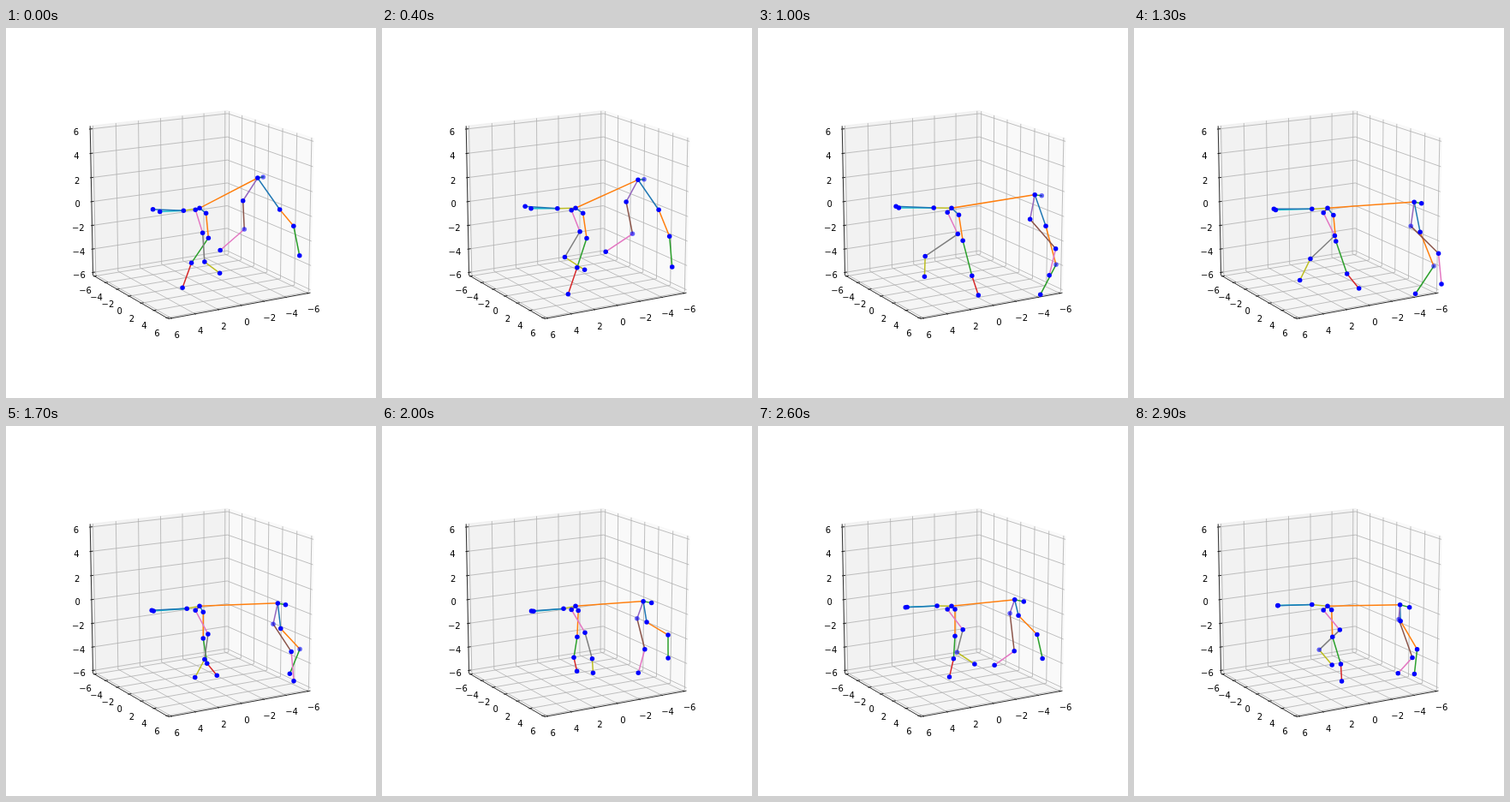
Recreate the animation shown at these times as an HTML page. Size 432 by 432 pixels, loop 3000 ms.

```html
<!DOCTYPE html>
<html lang="en">
<head>
<meta charset="utf-8">
<title>Walking skeleton in 3D axes</title>
<style>
html, body { margin: 0; width: 100%; height: 100%; overflow: hidden; background: #fff; }
svg { display: block; width: 100vw; height: 100vh; }
text { font: 10px "DejaVu Sans", sans-serif; text-anchor: middle; }
line { stroke-linecap: square; }
</style>
</head>
<body>
<svg viewBox="0 0 432 432"><g id="axes"></g><g id="bones"></g><g id="dots"></g></svg>
<script>
const LOOP = 3, STEP = 0.1;            // seconds
const STRIDE = 2.3, MID_STRIDE = 1.3;  // seconds
const [BLUE, ORANGE, GREEN, RED, PURPLE, BROWN, PINK, GRAY, OLIVE, CYAN] =
  ['#1f77b4', '#ff7f0e', '#2ca02c', '#d62728', '#9467bd',
   '#8c564b', '#e377c2', '#7f7f7f', '#bcbd22', '#17becf'];
const [axes, bones, dots] = ['axes', 'bones', 'dots'].map(id => document.getElementById(id));

function set(el, attrs) {
  for (const k in attrs) el.setAttribute(k, attrs[k]);
}
function add(parent, tag, attrs) {
  const el = document.createElementNS('http://www.w3.org/2000/svg', tag);
  set(el, attrs);
  return parent.appendChild(el);
}

// Perspective view of the unit box: azimuth 60, elevation 15, distance 10.
const AZ = Math.PI / 3, EL = Math.PI / 12;
function project([x, y, z]) {
  const right = y * Math.cos(AZ) - x * Math.sin(AZ);
  const toward = x * Math.cos(AZ) + y * Math.sin(AZ);
  const up = z * Math.cos(EL) - toward * Math.sin(EL);
  const scale = 1808 / (10 - toward * Math.cos(EL) - z * Math.sin(EL));
  return [226.2 + right * scale, 211.3 - up * scale * 0.975];
}
function path(points, stroke, width, fill = 'none') {
  const d = 'M' + points.map(p => project(p).map(v => v.toFixed(2)).join(' ')).join('L');
  add(axes, 'path', { d, fill, stroke, 'stroke-width': width });
}
function drawAxes() {
  const E = 0.5208, L = 0.589, IN = E - 0.0167, OUT = E + 0.0083;
  const ring = [[-E, -E], [E, -E], [E, E], [-E, E], [-E, -E]];
  path(ring.map(([a, b]) => [-E, a, b]), '#f9f9f9', 1, '#f9f9f9');
  path(ring.map(([a, b]) => [a, -E, b]), '#f2f2f2', 1, '#f2f2f2');
  path(ring.map(([a, b]) => [a, b, -E]), '#f5f5f5', 1, '#f5f5f5');
  const sides = [
    { line: [[E, E, -E], [-E, E, -E]], grid: t => [[t, E, -E], [t, -E, -E], [t, -E, E]],
      tick: t => [[t, IN, -E], [t, OUT, -E]], label: t => [t, L, -L] },
    { line: [[E, -E, -E], [E, E, -E]], grid: t => [[E, t, -E], [-E, t, -E], [-E, t, E]],
      tick: t => [[IN, t, -E], [OUT, t, -E]], label: t => [L, t, -L] },
    { line: [[E, -E, -E], [E, -E, E]], grid: t => [[E, -E, t], [-E, -E, t], [-E, E, t]],
      tick: t => [[IN, -E, t], [OUT, -E, t]], label: t => [L, -L, t] }
  ];
  for (const side of sides) {
    path(side.line, '#000', 0.8);
    for (let n = -6; n <= 6; n += 2) path(side.grid(n / 12), '#b0b0b0', 0.8);
    for (let n = -6; n <= 6; n += 2) {
      path(side.tick(n / 12), '#000', 0.8);
      const [x, y] = project(side.label(n / 12));
      add(axes, 'text', { x, y: y + 7.8 }).textContent = n < 0 ? '\u2212' + -n : n;
    }
  }
}

// One stride as a cosine, delayed by lag seconds; t counts from mid-stride.
const wave = (t, lag = 0) => Math.cos(2 * Math.PI * (t - lag) / STRIDE);

// place(t) gives the position: a rest point, a drift and a swing.
// far(t) tells when the dot is dimmed by depth.
const joints = [];
function joint(parent, color, place, far = () => false) {
  const j = { parent, place, far, dot: add(dots, 'circle', { r: 2.75, fill: '#00f' }) };
  if (parent) j.bone = add(bones, 'line', { stroke: color, 'stroke-width': 1.5 });
  joints.push(j);
  return j;
}

drawAxes();

const root = joint(null, null, () => [226, 210.3]);

const hipA = joint(root, BLUE, t => [232.3 - 1.9 * t + 1.8 * wave(t, -.46), 216.8 - .9 * t + 1.8 * wave(t)]);
const kneeA = joint(hipA, ORANGE, t => [234.4 - 3.6 * t + 4 * wave(t, -.45), 247 + 2 * wave(t)]);
const hockA = joint(kneeA, GREEN, t => [235 + 2 * t + 16 * wave(t, -.2), 279.6 - 2.6 * t + 9 * wave(t, -.23)]);
joint(hockA, RED, t => [237.7 + 5 * t + 25.6 * wave(t, -.08), 301 - 6.8 * t + 10 * wave(t, -.46)]);

const hipB = joint(root, BROWN, t => [221.2, 214.4 + .7 * t + 1.4 * wave(t)]);
const kneeB = joint(hipB, PINK, t => [234.4 + 3.7 * t, 240.4 + 2.7 * wave(t, .25)]);
const hockB = joint(kneeB, GRAY, t => [219.6 + 5.8 * t + 22.8 * wave(t, .81), 269 - 2 * t + 4.6 * wave(t, .54)],
  t => t > 1);
joint(hockB, OLIVE, t => [223.7 + 4.4 * t + 31.7 * wave(t, 1.03), 288 - 2 * t + 7.5 * wave(t, .2)]);

const tail = joint(root, OLIVE, t => [208 + 1.6 * t + 3 * wave(t, .6), 211.5 - .6 * t + 2.2 * wave(t, .6)]);
joint(tail, CYAN, t => [171.4 - .8 * t + 7.4 * wave(t, .92), 212.8 + 3.7 * wave(t, .6)]);
joint(tail, BLUE, t => [167.8 + 1.6 * t + 6.2 * wave(t, .87), 211.5 + 1.1 * t + 3.8 * wave(t, .6)]);

const chest = joint(root, ORANGE, t => [311.3 + 1.6 * t + 16 * wave(t, -.05), 195.7 + 11.7 * t + 8.2 * wave(t, .16)]);
joint(chest, GREEN, t => [319.8 + 3.2 * t + 16 * wave(t, -.05), 196.8 + 13 * t + 8.7 * wave(t, .15)],
  t => t < -.3);

const elbowA = joint(chest, BLUE, t => [322.5 - 7.4 * t + 12.5 * wave(t, -.14), 227 + 4.5 * t + 11.7 * wave(t, .09)]);
const wristA = joint(elbowA, ORANGE, t => [340 - 3.8 * t + 10 * wave(t), 256.8 + 2.3 * t + 22.6 * wave(t, -.13)],
  t => t > -.6 && t < .7);
joint(wristA, GREEN, t => [333.2 - 3.5 * t + 5 * wave(t, 1.01), 288.6 - .9 * t + 24 * wave(t, -.16)]);

const elbowB = joint(chest, PURPLE, t => [303.5 + 5.7 * t + 20 * wave(t, -.06), 220.3 + 7.5 * t + 11.5 * wave(t, .1)],
  t => t > -.1);
const wristB = joint(elbowB, BROWN, t => [320.7 + 6 * t + 35.5 * wave(t, -.07), 255.8 + 10.7 * t + 7.5 * wave(t)],
  t => t < -.7);
joint(wristB, PINK, t => [309 + 10 * t + 50 * wave(t), 283.6 + 8.8 * t + 16 * wave(t, .09)]);

function render(seconds) {
  const t = Math.floor((seconds % LOOP) / STEP) * STEP - MID_STRIDE;
  for (const j of joints) {
    [j.x, j.y] = j.place(t);
    set(j.dot, { cx: j.x, cy: j.y, opacity: j.far(t) ? 0.6 : 1 });
    if (j.bone) set(j.bone, { x1: j.parent.x, y1: j.parent.y, x2: j.x, y2: j.y });
  }
}

const start = performance.now();
function loop() {
  render((performance.now() - start) / 1000);
  requestAnimationFrame(loop);
}
loop();
</script>
</body>
</html>
```
